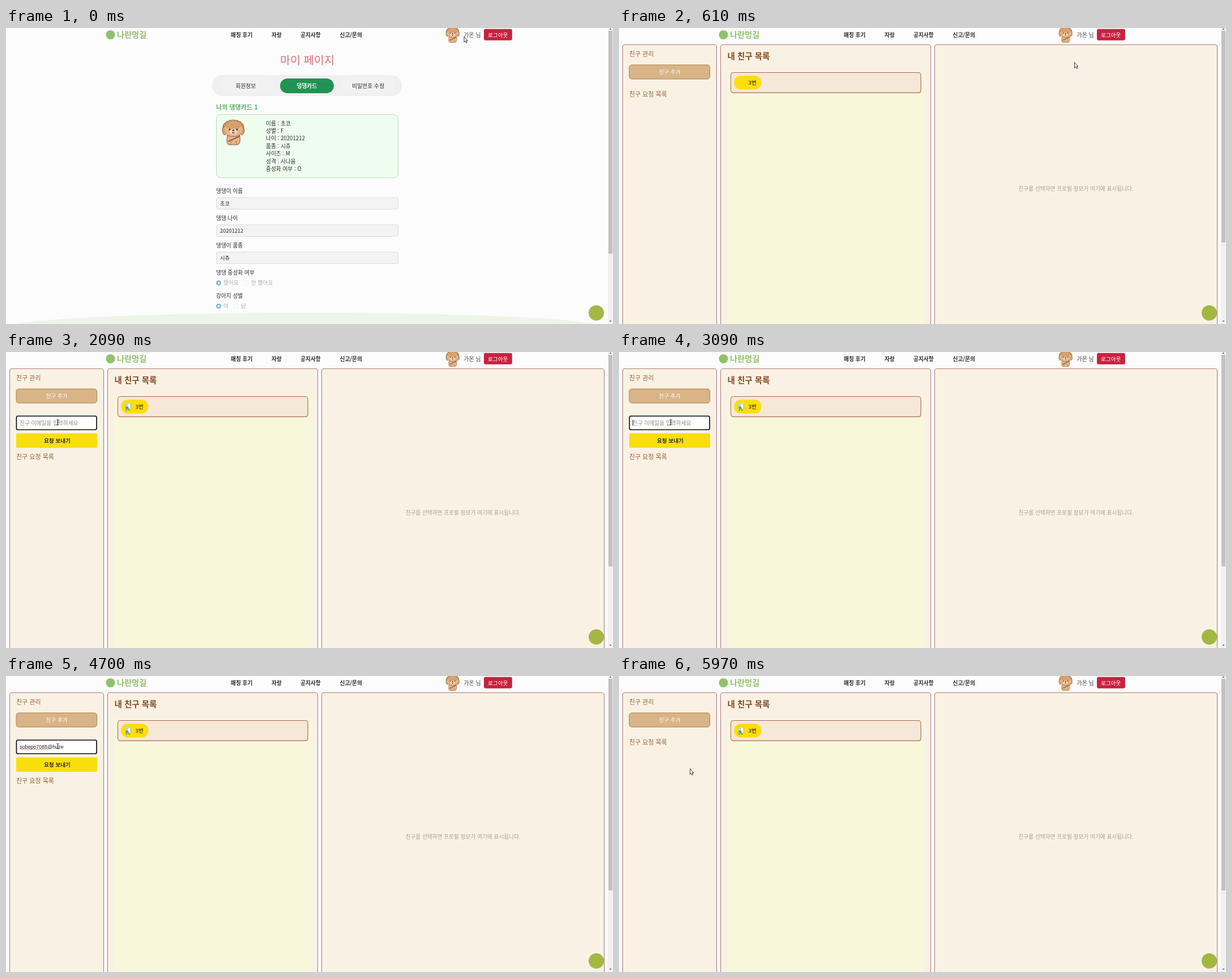
An HTML page that plays this animation: 1072x522 px, repeating every 6000 ms.

```html
<!DOCTYPE html>
<html lang="ko">
<head>
<meta charset="utf-8">
<title>마이 페이지</title>
<style>
html, body { margin: 0; width: 100%; height: 100%; overflow: hidden; background: #fcfcfc; }
svg { display: block; width: 100%; height: 100%; }
text { font-family: "Noto Sans CJK KR", "Noto Sans KR", "Noto Sans CJK", sans-serif; white-space: pre; }
text.latin { font-family: "Liberation Sans", "Noto Sans CJK KR", "Noto Sans CJK", sans-serif; }
</style>
</head>
<body>
<svg id="stage" viewBox="0 0 1072 522"></svg>
<script>
const LOOP = 6000;
const BRAND = '나란멍길';
const EMAIL = 'sobepo7085@huzek.lan';
const BROWN = '#985f38', EDGE = '#b27a7a', INK = '#2c2c2c';

// cy is the vertical middle of the line
const text = (x, cy, str, size = 9.7, fill = INK, weight = 400, cls = '') =>
  `<text class="${cls}" x="${x}" y="${cy + size * 0.37}" font-size="${size}" fill="${fill}" font-weight="${weight}">${str}</text>`;
const latin = (x, cy, str, size, fill = '#484b48') => text(x, cy, str, size, fill, 400, 'latin');
const box = (x, y, w, h, r, fill, stroke = 'none', sw = 1) =>
  `<rect x="${x}" y="${y}" width="${w}" height="${h}" rx="${r}" fill="${fill}" stroke="${stroke}" stroke-width="${sw}"/>`;
const dot = (x, y, r, fill, stroke = 'none', sw = 1) =>
  `<circle cx="${x}" cy="${y}" r="${r}" fill="${fill}" stroke="${stroke}" stroke-width="${sw}"/>`;
const oval = (x, y, rx, ry, fill, stroke = 'none', sw = 1) =>
  `<ellipse cx="${x}" cy="${y}" rx="${rx}" ry="${ry}" fill="${fill}" stroke="${stroke}" stroke-width="${sw}"/>`;
const group = (id, body, attrs = '') => `<g id="${id}" ${attrs}>${body}</g>`;

const logo = (x, y, fill) => dot(x + 8.5, y, 8, fill) + text(x + 20, y, BRAND, 14.2, fill, 900);

function puppy(x, y, s) {
  const line = '#8a5a38', fur = '#d9a06c', skin = '#e6b587';
  let curls = '';
  for (let i = 0; i < 9; i++) {
    const a = Math.PI * (1 + i / 8);
    curls += dot(20 + 14 * Math.cos(a), 14 + 8.5 * Math.sin(a), 4.6, fur, line, 0.9);
  }
  return `<g transform="translate(${x} ${y}) scale(${s})">
    <path d="M10 27Q6 45 13 45H27Q34 44 31 27Z" fill="${skin}" stroke="${line}"/>
    <path d="M15 45Q15 39 18 38M26 45Q26 39 23 38" fill="none" stroke="${line}" stroke-width=".8"/>
    <path d="M31 30L11 39" stroke="#7a5235" stroke-width="1.8"/>
    ${curls}
    ${oval(5, 20, 4.3, 7.5, fur, line, 0.9)}${oval(35, 20, 4.3, 7.5, fur, line, 0.9)}
    ${oval(20, 17, 15.5, 13, skin)}
    ${oval(20, 11, 14, 6.5, fur)}
    ${oval(20, 22, 6.5, 5, '#f5dcc0')}
    ${dot(13.5, 18, 1.4, '#35221a')}${dot(26.5, 18, 1.4, '#35221a')}
    ${oval(20, 19.5, 1.9, 1.3, '#35221a')}
    <path d="M17.5 23Q20 27.5 22.5 23Z" fill="#c9655c" stroke="#5a3424" stroke-width=".6"/>
    <path d="M8 28Q20 33 32 28" fill="none" stroke="${line}" stroke-width=".9"/></g>`;
}

const header = () =>
  logo(176, 12, '#92c06c') +
  [[397, '매칭 후기'], [469, '자랑'], [520, '공지사항'], [589.5, '신고/문의']]
    .map(([x, s]) => text(x, 12, s, 9.7, INK, 700)).join('') +
  puppy(776.5, -2, 0.61) + text(808.5, 12, '가온 님', 9.9, '#444') +
  box(844, 1.8, 49.8, 20, 3, '#c8213f') + text(851, 12, '로그아웃', 9.6, '#fff');

const scrollbar = end =>
  box(1063, 0, 9, 522, 0, '#f1f1f1') + box(1064, 5, 7, end - 5, 0, '#c1c1c1') +
  '<path d="M1065.5 3L1067.5 .5L1069.5 3ZM1065.5 516L1067.5 518.5L1069.5 516Z" fill="#666"/>';

const hill = (w, top) =>
  `<path d="M0 ${top + 27}A${w / 2} 27 0 0 1 ${w} ${top + 27}V560H0Z" fill="#edf5ea"/>`;

function cardPage() {
  const info = ['이름 : 초코', '성별 : F', '나이 : 20201212', '품종 : 시츄', '사이즈 : M', '성격 : 사나움', '중성화 여부 : O'];
  const fields = [['댕댕이 이름', '초코'], ['댕댕 나이', '20201212'], ['댕댕이 품종', '시츄']];
  const radio = (y, a, bx, b) =>
    dot(375.5, y, 3.2, '#fff', '#82b6cf', 2.6) + text(384, y, a, 9.7, '#adadad') +
    dot(bx - 9, y, 4, '#fdfdfd', '#f2f2f2') + text(bx, y, b, 9.7, '#adadad');
  return hill(1063, 502) +
    text(484, 56.5, '마이 페이지', 19.7, '#dc6f78') +
    box(364, 83, 335, 37, 18, '#f0f0f0') +
    box(377, 89, 94, 26, 13, '#f2f2f2') + box(484, 89, 95, 26, 13, '#209354') + box(592, 89, 95, 26, 13, '#f2f2f2') +
    text(405.5, 102, '회원정보', 9.7, INK, 500) + text(513.5, 102, '댕댕카드', 9.7, '#fff', 700) +
    text(611, 102, '비밀번호 수정', 9.9, INK, 500) +
    text(371, 139.5, '나의 댕댕카드 1', 11.05, '#5fae62', 700) +
    box(371.5, 152.5, 321, 111.5, 8, '#effdef', '#bdd6bf') + puppy(381.5, 161, 1) +
    info.map((s, i) => text(459, 168 + i * 13.4, s, 9.7)).join('') +
    fields.map(([name, value], i) =>
      text(371, 287 + i * 48, name) + box(371.5, 299 + i * 48, 321, 20.5, 3, '#f3f3f3', '#dcdcdc') +
      text(378, 309.3 + i * 48, value, 9.3)).join('') +
    text(371, 431.5, '댕댕 중성화 여부') + radio(449.5, '했어요', 433, '안 했어요') +
    text(371, 472.5, '강아지 성별') + radio(490.5, '여', 415, '남');
}

const footer = () =>
  hill(1072, 348.5) + logo(207, 412, '#a1ca7c') +
  latin(201, 444, '이용안내 02-0147-0258', 9.1) + latin(201, 460.5, '후원안내 02-0369-0471', 9.1) +
  latin(201, 477, '운영시간 09:00-18:00 (주말 및 공휴일 휴무)', 9.45) +
  latin(536, 444, `주소: 해온특별시 솔마루로 3길 5(${BRAND})`, 9.6) +
  latin(536, 460.5, '전화: 02-0582-0693 팩스: 02-0582-0693', 9.1) +
  latin(410, 504.5, `Copyright © 2024 ${BRAND} All rights reserved.`, 7.93) +
  latin(571, 504.5, 'designed by Taebomin', 9) +
  '<path d="M1035 398.5Q1042 397 1042 401.5Q1042 403 1041 404L1042 405.5Q1039 406 1038 405Q1034 405.5 1033.5 402.5Z" fill="#333"/>' +
  oval(1033.5, 398, 5, 4.2, '#333', '#edf5ea', 0.6) + '<path d="M1030 399L1028.5 403L1034 402Z" fill="#333"/>' +
  box(1049, 394, 10, 10, 0, '#333');

function friendsPage() {
  const panel = (x, w) => box(x, 29.5, w, 520, 4, '#f9f2e4', EDGE, 1.1);
  const icon = '<path d="M211 90H217.5L220 92.5V101H211Z" fill="#f7f9ff" stroke="#9aa6b5" stroke-width=".8"/>' +
    '<path d="M211.5 100.5V96.5L214 95L218 100.5Z" fill="#58a24b"/><path d="M212 91.5H216V94.5H212Z" fill="#a9c9ee"/>' +
    '<path d="M211.5 102.5H214M216 102.5H218.5" stroke="#554a10"/>';
  const form = box(18, 112.5, 142.5, 25, 1, '#fff', '#e2dfda') +
    group('focus', box(18.5, 113, 141.5, 24, 2.5, '#fff', '#111', 1.7)) +
    group('hint', text(24, 125, '친구 이메일을 입력하세요', 9.7, '#8c8c8c')) +
    '<path id="caret" d="M24.5 119.5V130" stroke="#111" stroke-width=".9"/>' +
    '<text id="typed" class="latin" x="24" y="128.3" font-size="8.95" fill="#222"></text>' +
    `<path id="squiggle" d="M24 130${'l1.5 -1.6l1.5 1.6'.repeat(17)}" fill="none" stroke="#d8434a" stroke-width=".8"/>` +
    box(18, 143.5, 143, 25.5, 2, '#f8df0c') + text(67, 156, '요청 보내기', 9.65, INK, 700);
  return panel(6.5, 166) + panel(179.5, 371) + panel(557.5, 499) +
    text(18, 45.5, '친구 관리', 11, BROWN) +
    box(18, 65, 142.5, 25, 4.5, '#d8b487', '#b0814f') + text(70.5, 77, '친구 추가', 9.65, '#fff', 500) +
    group('form', form) + group('requests', text(18, 117.3, '친구 요청 목록', 11, BROWN)) +
    text(191.5, 50, '내 친구 목록', 14.5, '#834a24', 700) +
    box(191, 76, 348, 460, 3, '#f9f7da') +
    box(198, 79.5, 335.5, 35.5, 4, '#d2b3a4') + box(197.5, 78.5, 335.5, 35.5, 4, '#f5e8d8', '#ae6455') +
    box(203, 84, 48.5, 24.5, 12, '#fadf0b') + group('broken', icon) + text(228.5, 96, '3번', 9.5, '#6a4a1c', 600) +
    text(705.5, 283.5, '친구를 선택하면 프로필 정보가 여기에 표시됩니다.', 9.68, '#a3a09b');
}

document.getElementById('stage').innerHTML =
  box(0, 0, 1072, 522, 0, '#fcfcfc') +
  group('card', cardPage() + scrollbar(398)) +
  group('loading', footer()) +
  group('friends', friendsPage() + scrollbar(378)) +
  group('header', header()) + group('badge', dot(0, 0, 13.6, '#a3b843')) +
  group('arrow', '<path d="M0 0V10L2.2 8L3.8 11.2L5.3 10.4L3.7 7.3H6.2Z" fill="#fff" stroke="#222" stroke-width=".9" stroke-linejoin="round"/>') +
  group('beam', '<path d="M-2 -4.5H-.6L0 -4L.6 -4.5H2M0 -4V4M-2 4.5H-.6L0 4L.6 4.5H2" fill="none" stroke="#222"/>');

const el = id => document.getElementById(id);
const show = (id, on) => { el(id).style.display = on ? '' : 'none'; };
const move = (id, x, y) => el(id).setAttribute('transform', `translate(${x} ${y})`);

// time, x, y of the pointer
const route = [
  [30, 809, 15], [450, 804.5, 60.5], [640, 804.5, 60.5], [1120, 95, 78], [1190, 95, 78],
  [1360, 52, 133], [1510, 91.5, 124], [5490, 91.5, 124], [5720, 125.5, 163.5]
];
function pointer(t) {
  let a = route[0];
  for (const b of route) {
    if (t < b[0]) {
      const p = Math.max(0, (t - a[0]) / (b[0] - a[0] || 1)), e = p * p * (3 - 2 * p);
      return [a[1] + (b[1] - a[1]) * e, a[2] + (b[2] - a[2]) * e];
    }
    a = b;
  }
  return [a[1], a[2]];
}

function typedCount(t) {
  const burst = (start, gap, max) => t < start ? 0 : Math.min(max, 1 + Math.floor((t - start) / gap));
  return burst(3300, 115, 10) + burst(4490, 50, 5) + burst(4850, 130, 5);
}

const FOCUS = 1520, BLINK = 530;

function draw(t) {
  const loading = t >= 550 && t < 610, friends = t >= 610;
  const form = t >= 1190 && t < 5820, focused = t >= FOCUS;
  const count = typedCount(t);
  show('card', t < 550);
  show('loading', loading);
  show('friends', friends);
  move('header', loading ? 4.5 : 0, 0);
  move('badge', loading ? 1051.5 : 1042.5, 502.5);
  show('broken', t >= 640);
  show('form', form);
  move('requests', 0, form ? 68 : 0);
  show('focus', focused);
  show('hint', !count);
  show('caret', focused && !count && (t - FOCUS) % (2 * BLINK) < BLINK);
  el('typed').textContent = EMAIL.slice(0, count);
  show('squiggle', count > 10);

  const [x, y] = pointer(t);
  const beam = form && x > 18 && x < 161 && y > 112 && y < 138;
  show('arrow', !beam);
  show('beam', beam);
  move(beam ? 'beam' : 'arrow', x, y);
}

const start = performance.now();
function tick() {
  draw((performance.now() - start) % LOOP);
  requestAnimationFrame(tick);
}
draw(0);
requestAnimationFrame(tick);
</script>
</body>
</html>
```
